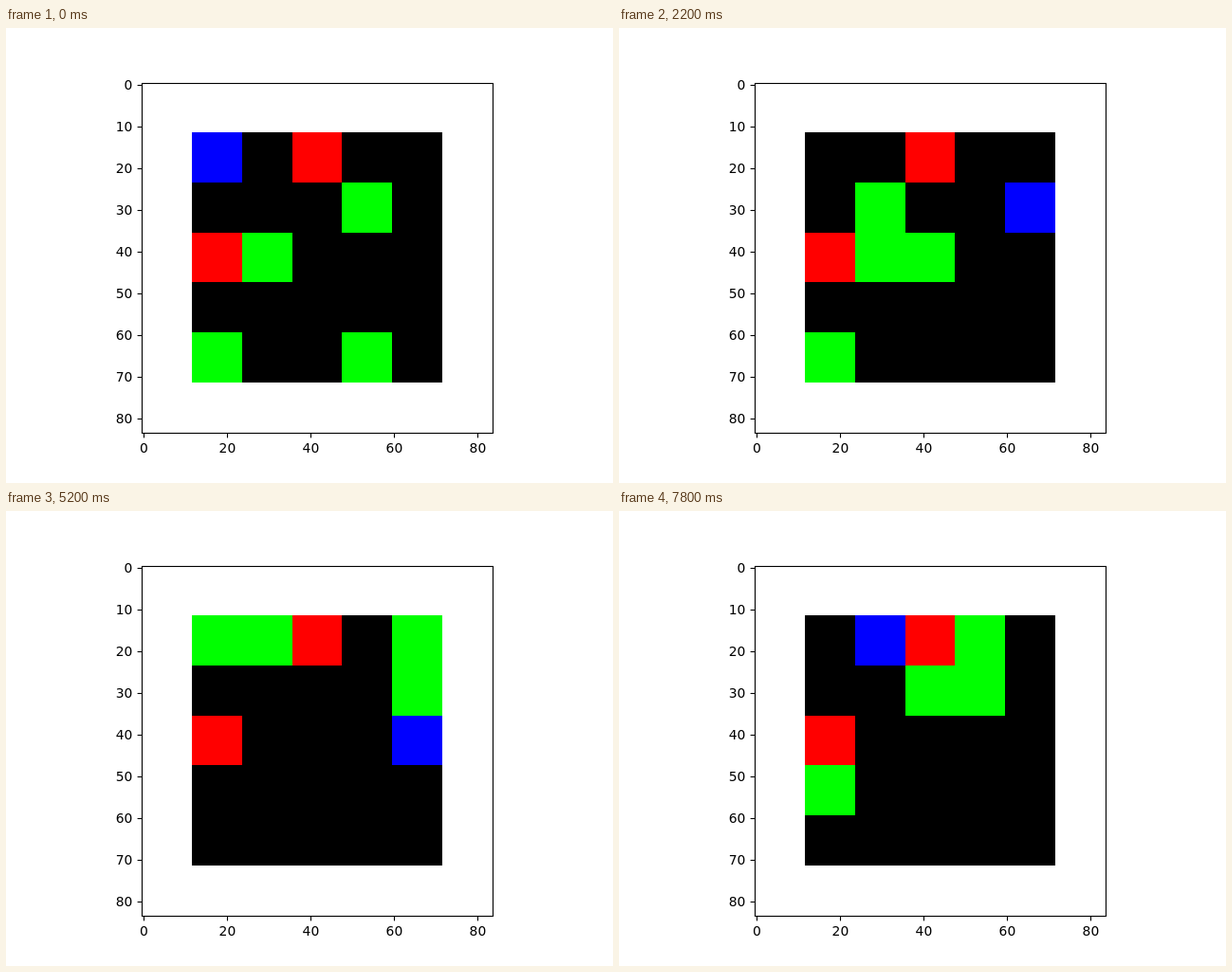
An HTML page for the animation above (8000 ms loop, 640 by 480 pixels).

```html
<!DOCTYPE html>
<html lang="en">
<head>
<meta charset="utf-8">
<title>Grid world</title>
<style>
  html, body { margin: 0; width: 100%; height: 100%; overflow: hidden; background: #fff; }
  svg { display: block; width: 640px; height: 480px; }
  text { font: 13.89px "DejaVu Sans", sans-serif; }
  .line { fill: none; stroke: #000; stroke-width: 1.11; }
</style>
</head>
<body>
<svg viewBox="0 0 640 480">
  <g id="axes"></g>
  <g id="board" shape-rendering="crispEdges"></g>
  <rect class="line" x="143.5" y="58.5" width="370" height="369"/>
</svg>
<script>
const STEP = 200;
const MOVES = "RDDDRR" + "DUUUR" + "LLLDRD" + "DLLUR" + "RRRUUUDD" + "DLLUULLUR";
const DIRS = { R: [1, 0], L: [-1, 0], U: [0, -1], D: [0, 1] };
// Cells are "column row"; each eaten food is replaced by the next spawn.
const WALLS = ["20", "02"];
const FOOD = ["31", "12", "04", "34"];
const SPAWNS = "33 12 11 41 22 40 41 10 43 00 43 22 30 03 31 21".split(" ");

const axes = document.getElementById("axes");
const board = document.getElementById("board");
const edgeX = c => Math.round(196 + 52.8 * c);
const edgeY = r => Math.floor(110.4 + 52.8 * r);

function add(parent, tag, attrs, text = "") {
  const el = document.createElementNS("http://www.w3.org/2000/svg", tag);
  for (const key in attrs) el.setAttribute(key, attrs[key]);
  el.textContent = text;
  return parent.appendChild(el);
}

function place(el, cell) {
  const [c, r] = [...cell].map(Number);
  el.setAttribute("x", edgeX(c));
  el.setAttribute("y", edgeY(r));
  el.setAttribute("width", edgeX(c + 1) - edgeX(c));
  el.setAttribute("height", edgeY(r + 1) - edgeY(r));
}

function drawAxes() {
  for (let v = 0; v <= 80; v += 10) {
    const y = Math.round(59.8 + 4.4 * v) + 0.5;
    add(axes, "path", { class: "line", d: `M138.6 ${y}H143.5` });
    add(axes, "text", { x: 133.4, y: y + 4.5, "text-anchor": "end" }, v);
    if (v % 20) continue;
    const x = 145.4 + 4.4 * v;
    add(axes, "path", { class: "line", d: `M${Math.round(x) + 0.5} 427.5V432.4` });
    add(axes, "text", { x, y: 448, "text-anchor": "middle" }, v);
  }
}

function simulate() {
  let x = 0, y = 0, food = FOOD, eaten = 0;
  const states = [{ agent: "00", food }];
  for (const move of MOVES) {
    x += DIRS[move][0];
    y += DIRS[move][1];
    const agent = `${x}${y}`;
    if (food.includes(agent)) {
      const spawn = SPAWNS[eaten++];
      food = food.map(cell => cell === agent ? spawn : cell);
    }
    states.push({ agent, food });
  }
  return states;
}

drawAxes();
add(board, "rect", { x: 196, y: 110, width: 264, height: 264 });
const square = fill => add(board, "rect", { fill });
WALLS.forEach(cell => place(square("#f00"), cell));
const foodEls = FOOD.map(() => square("#0f0"));
const agentEl = square("#00f");
const states = simulate();
const start = performance.now();

function render(now) {
  const step = Math.floor(Math.max(0, now - start) / STEP) % states.length;
  const { agent, food } = states[step];
  food.forEach((cell, i) => place(foodEls[i], cell));
  place(agentEl, agent);
  requestAnimationFrame(render);
}
render(start);
</script>
</body>
</html>
```
